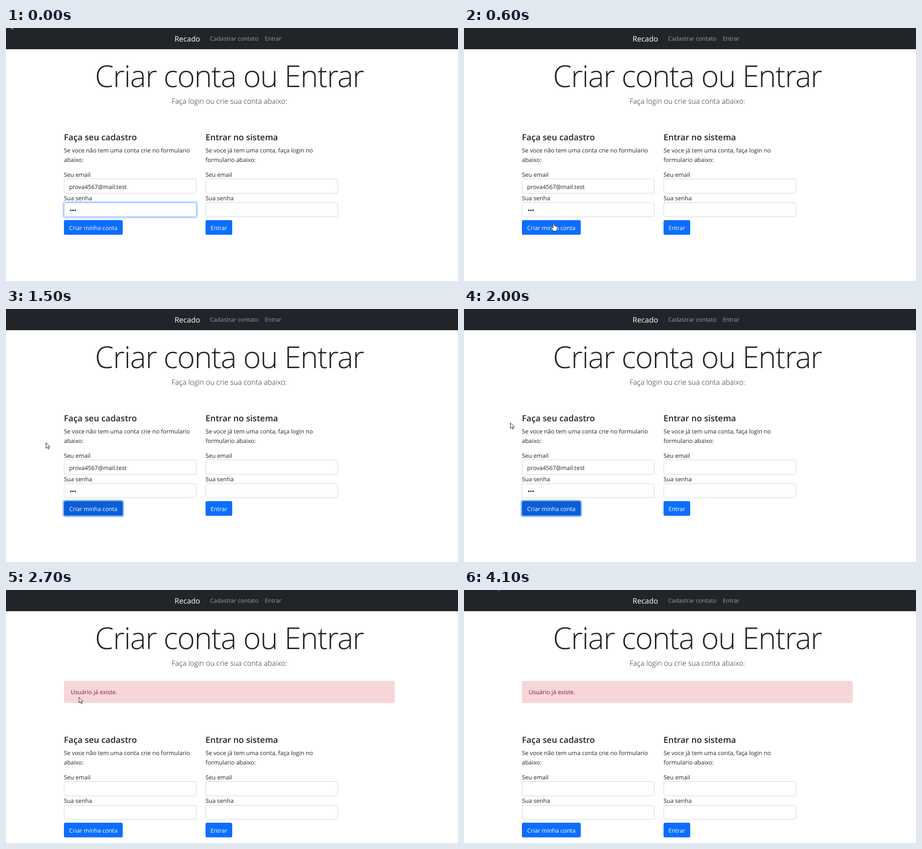
An HTML page that plays this animation: 999x561 px, repeating every 4500 ms.

```html
<!DOCTYPE html>
<html lang="pt">
<head>
<meta charset="utf-8">
<title>Criar conta ou Entrar</title>
<style>
html, body { margin: 0; width: 100%; height: 100%; overflow: hidden; background: #fff; }
svg { display: block; width: 999px; height: 561px; }
text { font: 12.95px "Open Sans", "Noto Sans", sans-serif; fill: #212529; text-rendering: geometricPrecision; }
.mid { text-anchor: middle; }
text.brand { font-size: 16.5px; fill: #fff; }
text.link { font-size: 12.8px; fill: #9b9d9f; }
text.display { font-size: 67px; font-weight: 300; letter-spacing: -.025em; }
text.lead { font-size: 16.1px; font-weight: 300; }
text.h4 { font-size: 18.8px; font-weight: 600; }
text.label { font-size: 12.8px; fill: #fff; }
text.error { fill: #842029; }
.field { fill: #fff; stroke: #ced4da; }
.button { fill: #0d6efd; }
.ring { fill: none; stroke-width: 3; }
.cursor { fill: #fff; stroke: #000; stroke-width: .9; stroke-linejoin: round; }
</style>
</head>
<body>
<svg id="stage" viewBox="0 0 999 561"></svg>
<script>
const LOOP = 4500, STEP = 100, RELOAD = 2100;

const text = (x, y, content, style = "") => `<text x="${x}" y="${y}" class="${style}">${content}</text>`;
const rect = (x, y, w, h, attrs) => `<rect x="${x}" y="${y}" width="${w}" height="${h}" rx="3.6" ${attrs}/>`;

const column = (x, title, lines, action, width, id) =>
  text(x, 249, title, "h4") +
  text(x, 276, lines[0]) +
  text(x, 296.5, lines[1]) +
  text(x, 330, "Seu email") +
  rect(x + .5, 334.5, 292, 32, 'class="field"') +
  text(x, 382, "Sua senha") +
  rect(x + .5, 387.5, 292, 31, `class="field" id="${id}Password"`) +
  rect(x, 426, width, 32.5, `class="button" id="${id}Button"`) +
  text(x + width / 2, 448, action, "label mid");

const dots = [143.2, 148, 152.8].map(x => `<circle cx="${x}" cy="404.3" r="1.7" fill="#212529"/>`).join("");

document.getElementById("stage").innerHTML =
  '<rect width="999" height="47" fill="#212529"/>' +
  text(372.5, 29.5, "Recado", "brand") +
  text(451, 28.3, "Cadastrar contato", "link") +
  text(572, 28.3, "Entrar", "link") +
  text(493.5, 130.5, "Criar conta ou Entrar", "display mid") +
  text(493.5, 168, "Faça login ou crie sua conta abaixo:", "lead mid") +
  '<g id="alert">' +
    rect(128.5, 202, 730, 48, 'fill="#f7d6d9" stroke="#f5d0d4"') +
    text(143, 231, "Usuário já existe.", "error") +
  "</g>" +
  '<g id="forms">' +
    column(128, "Faça seu cadastro", ["Se voce não tem uma conta crie no formulario", "abaixo:"], "Criar minha conta", 130, "signup") +
    column(441, "Entrar no sistema", ["Se voce já tem uma conta, faça login no", "formulario abaixo:"], "Entrar", 59, "login") +
    '<g id="filled">' + text(139.5, 356.5, "prova4567@mail.test") + dots + "</g>" +
    rect(126.5, 385.5, 296, 35, 'class="ring" id="fieldRing" stroke="#c2dbfe"') +
    rect(126.5, 424.5, 133, 35.5, 'class="ring" id="buttonRing" stroke="#98c1fe"') +
  "</g>" +
  '<path id="arrow" class="cursor" d="M.5 .5V13l3-2.7 2 4.4 2-.9-2-4.2H9.4Z"/>' +
  '<path id="hand" class="cursor" d="M-1.4 11V1.4Q0-.6 1.4 1.4V6Q3 5 3.6 6.6 5.2 5 5.6 7.4 7.2 6.2 7.4 9V13.5L5.8 18H-1L-5.2 11.5Q-5.4 9-3 10Z"/>';

const el = Object.fromEntries([...document.querySelectorAll("[id]")].map(node => [node.id, node]));

// Pointer keys: time, x, y
const path = [
  [0, 9, -10], [100, 28, 20], [300, 118, 240], [500, 194, 424], [600, 198.5, 432.5],
  [1000, 198.5, 432.5], [1100, 116, 330], [1200, 116, 330], [1500, 88, 296], [1800, 100, 255],
  [1900, 102, 252], [2300, 102, 252], [2400, 120, 248], [2500, 142, 239], [2600, 142, 239],
  [3200, 255, 229], [3300, 256, 229.5], [3500, 256, 229.5], [3900, 74, 3], [4000, 74, 3],
  [4100, 71, -12], [LOOP, 71, -12]
];

const ramp = (t, from, to) => Math.min(1, Math.max(0, (t - from) / (to - from)));
const mix = (a, b, k) => `rgb(${a.map((v, i) => Math.round(v + (b[i] - v) * k))})`;

function pointerAt(t) {
  const next = path.findIndex(key => key[0] > t);
  const [t0, x0, y0] = path[next - 1], [t1, x1, y1] = path[next];
  const k = ramp(t, t0, t1);
  return [x0 + (x1 - x0) * k, y0 + (y1 - y0) * k];
}

const show = (node, visible) => node.setAttribute("visibility", visible ? "visible" : "hidden");

function draw(now) {
  const t = Math.floor((now % LOOP) / STEP) * STEP;
  const reloaded = t >= RELOAD;
  const fieldFocus = 1 - ramp(t, 400, 600);
  const pressed = reloaded ? 0 : ramp(t, 600, 800);

  show(el.alert, reloaded);
  show(el.filled, !reloaded);
  el.forms.setAttribute("transform", `translate(0 ${reloaded ? 90 : 0})`);
  el.fieldRing.setAttribute("opacity", fieldFocus);
  el.signupPassword.style.stroke = mix([206, 212, 218], [134, 183, 254], fieldFocus);
  el.buttonRing.setAttribute("opacity", pressed);
  el.signupButton.style.fill = mix([13, 110, 253], [11, 94, 215], pressed);

  const [x, y] = pointerAt(t);
  show(el.hand, t >= 600 && t < 800);
  show(el.arrow, t < 600 || t >= 1100);
  for (const cursor of [el.arrow, el.hand]) cursor.setAttribute("transform", `translate(${x} ${y})`);
}

const start = performance.now();
function tick() {
  draw(performance.now() - start);
  requestAnimationFrame(tick);
}
tick();
</script>
</body>
</html>
```
